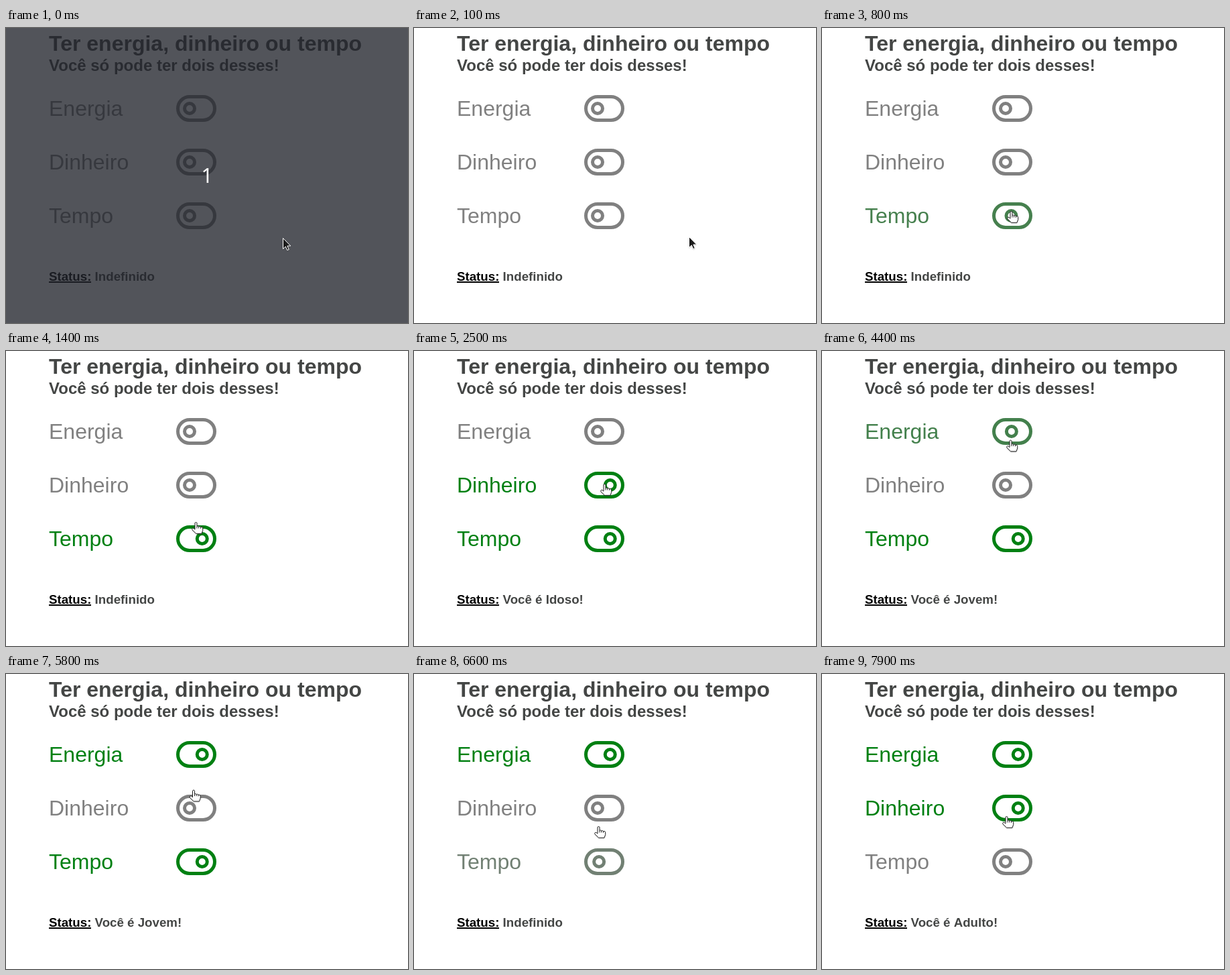
Write an HTML page with a canvas that moves like this. It is 600x440 px and loops after 8000 ms.

```html
<!DOCTYPE html>
<html lang="pt">
<head>
<meta charset="utf-8">
<style>
  html, body { margin: 0; width: 100%; height: 100%; overflow: hidden; background: #fff; }
  canvas { display: block; }
</style>
</head>
<body>
<canvas id="stage" width="600" height="440"></canvas>
<script>
const ctx = document.getElementById('stage').getContext('2d');
const LOOP = 8000, STEP = 100, FADE = 500;
const SANS = '"Liberation Sans", Arial, sans-serif';
const OFF = [128, 128, 128], ON = [0, 128, 18];
const INK = '#444645';

// Each row flips at the listed times, starting switched off.
const rows = [
  { label: 'Energia', y: 120, flips: [4260] },
  { label: 'Dinheiro', y: 200, flips: [1640, 3650, 6800] },
  { label: 'Tempo', y: 280, flips: [665, 6300] }
];

const statuses = [
  [0, 'Indefinido'], [1640, 'Você é Idoso!'], [3650, 'Indefinido'],
  [4260, 'Você é Jovem!'], [6300, 'Indefinido'], [6800, 'Você é Adulto!']
];

// Time, left, top of the pointer.
const pointerPath = [
  [0, 413, 313], [100, 410, 311], [400, 276, 273], [1300, 276, 273],
  [1400, 277, 255], [1500, 277, 255], [1700, 278, 198], [4200, 278, 198],
  [4400, 275, 132.5], [5700, 275, 132.5], [6100, 269, 293], [6400, 269, 293],
  [6600, 269, 227], [6700, 268, 208], [7800, 268, 208], [7900, 269, 212]
];

const arrow = new Path2D('M.5 .5V16.5L4.3 13L6.8 18.5L9.3 17.4L6.9 12H11.8Z');
const hand = new Path2D('M5 10.5V2Q5 .5 6.5 .5T8 2V6.5Q9.5 5.3 10.7 6.9' +
  'Q12.3 5.9 13.5 7.5Q16.7 6.8 16.7 9.8V12.5L15 17.3H6.7L1 11.8' +
  'Q0 10 1.6 9.3Q3 8.8 5 11.2Z');
const knuckles = new Path2D('M8 6.5V9.5M10.7 7V9.5M13.5 7.6V9.8');

const mix = (a, b, p) => a + (b - a) * p;

// The CSS "ease" curve, cubic-bezier(.25, .1, .25, 1).
function ease(x) {
  if (x <= 0) return 0;
  if (x >= 1) return 1;
  const bezier = (s, a, b) => 3 * s * (1 - s) * (1 - s) * a + 3 * s * s * (1 - s) * b + s * s * s;
  let lo = 0, hi = 1;
  for (let i = 0; i < 20; i++) {
    const mid = (lo + hi) / 2;
    if (bezier(mid, .25, .25) < x) lo = mid; else hi = mid;
  }
  return bezier(lo, .1, 1);
}

function switchLevel(flips, t) {
  return flips.reduce((sum, start, i) =>
    sum + (i % 2 ? -1 : 1) * ease((t - start) / FADE), 0);
}

function pointerAt(t) {
  const next = pointerPath.findIndex(k => k[0] > t);
  if (next < 0) return pointerPath[pointerPath.length - 1].slice(1);
  const a = pointerPath[next - 1], b = pointerPath[next];
  const p = (t - a[0]) / (b[0] - a[0]);
  return [mix(a[1], b[1], p), mix(a[2], b[2], p)];
}

function text(str, x, y, font, color) {
  ctx.font = font;
  ctx.fillStyle = color;
  ctx.fillText(str, x, y);
}

function drawRow({ label, y, flips }, t) {
  const level = switchLevel(flips, t);
  const color = `rgb(${OFF.map((c, i) => Math.round(mix(c, ON[i], level)))})`;
  text(label, 64, y + 11, `32px ${SANS}`, color);
  ctx.strokeStyle = color;
  ctx.lineWidth = 5;
  ctx.beginPath();
  ctx.roundRect(256.5, y - 17.5, 55, 35, 17.5);
  ctx.stroke();
  ctx.beginPath();
  ctx.arc(274 + 18.75 * level, y, 7.5, 0, Math.PI * 2);
  ctx.stroke();
}

function drawPointer(t) {
  const [x, y] = pointerAt(t);
  const isArrow = x > 314;
  const shape = isArrow ? arrow : hand;
  ctx.save();
  ctx.translate(x, y);
  ctx.lineWidth = 1;
  ctx.lineJoin = 'round';
  ctx.shadowColor = 'rgba(0,0,0,.3)';
  ctx.shadowBlur = 2;
  ctx.shadowOffsetY = 1;
  ctx.fillStyle = isArrow ? '#1c1c1c' : '#fff';
  ctx.fill(shape);
  ctx.shadowColor = 'transparent';
  ctx.strokeStyle = isArrow ? '#fff' : '#222';
  ctx.stroke(shape);
  if (!isArrow) ctx.stroke(knuckles);
  ctx.restore();
}

function drawCountdown() {
  ctx.fillStyle = 'rgba(34,37,44,.78)';
  ctx.fillRect(0, 0, 600, 440);
  ctx.textAlign = 'center';
  text('1', 300, 231, '30px "Noto Sans", sans-serif', '#fff');
  ctx.textAlign = 'left';
}

function draw(t) {
  ctx.fillStyle = '#fff';
  ctx.fillRect(0, 0, 600, 440);
  text('Ter energia, dinheiro ou tempo', 64, 34, `bold 32px ${SANS}`, INK);
  text('Você só pode ter dois desses!', 64, 64, `bold 24px ${SANS}`, INK);
  rows.forEach(row => drawRow(row, t));

  const statusFont = `bold 18.72px ${SANS}`;
  text('Status:', 64, 377, statusFont, '#000');
  const width = ctx.measureText('Status:').width;
  ctx.fillRect(64, 378, Math.round(width), 2);
  const status = statuses.filter(s => s[0] <= t).pop()[1];
  text(status, 64 + ctx.measureText('Status: ').width, 377, statusFont, INK);

  if (t < STEP) drawCountdown();
  drawPointer(t);
}

const began = performance.now();
function tick() {
  const t = (performance.now() - began) % LOOP;
  draw(Math.floor(t / STEP) * STEP);
  requestAnimationFrame(tick);
}
tick();
</script>
</body>
</html>
```
